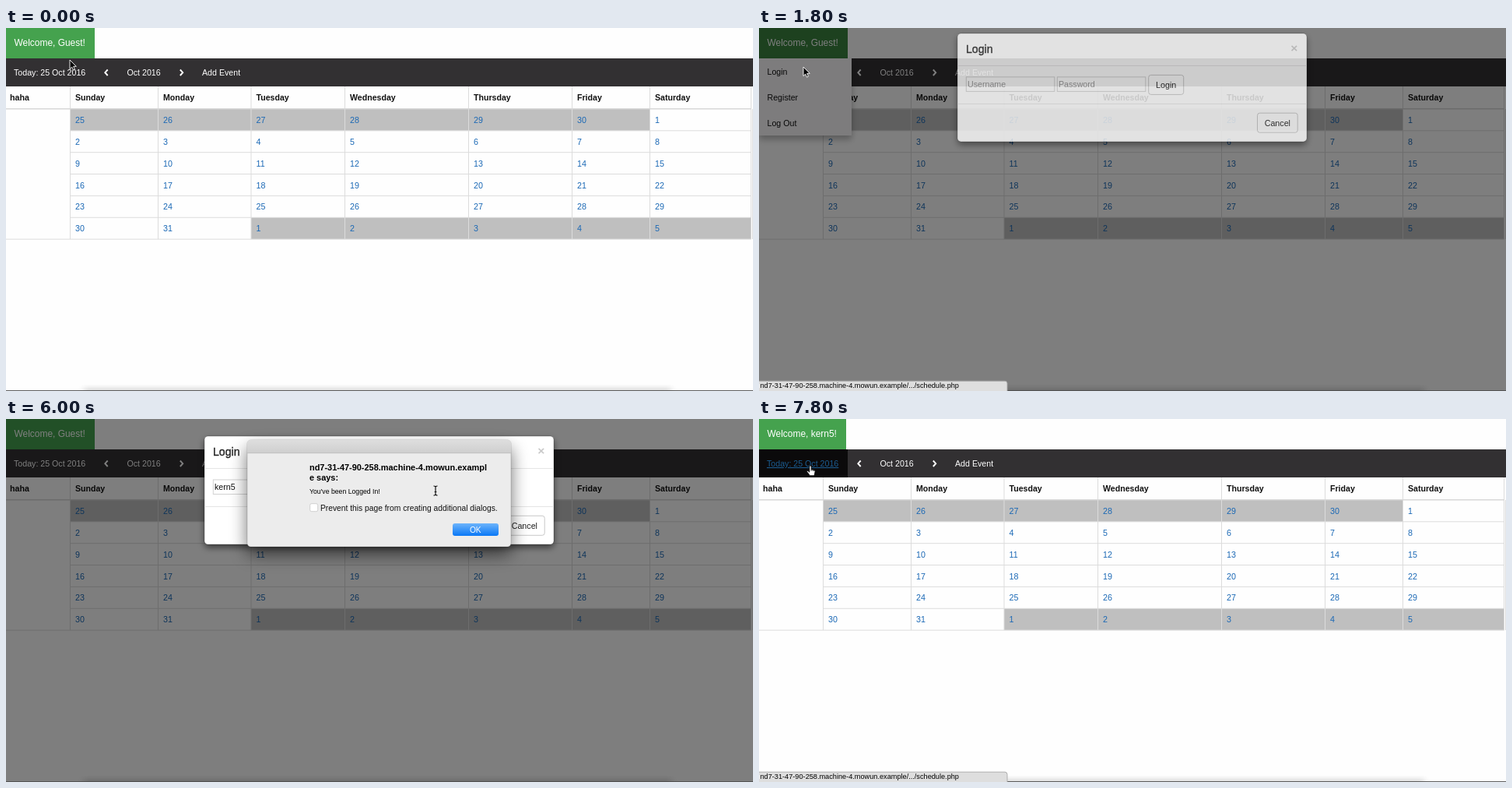
Write an HTML page that moves like this. It is 960 by 466 pixels and loops after 8000 ms.

```html
<!DOCTYPE html>
<html lang="en">
<head>
<meta charset="utf-8">
<title>Calendar login</title>
<style>
html, body { margin: 0; width: 100%; height: 100%; overflow: hidden; background: #fefefe; }
svg { display: block; width: 100vw; height: 100vh; }
text { font-family: "Liberation Sans", Arial, sans-serif; white-space: pre; }
</style>
</head>
<body>
<svg id="stage" viewBox="0 0 960 466"></svg>
<script>
const LOOP = 8000, STEP = 200;
const USER = 'kern5';
const HOST = 'nd7-31-47-90-258.machine-4.mowun.example';
const LINK = '#1a68b5', BODY = '#111';

const rect = (x, y, w, h, fill, more = '') =>
  `<rect x="${x}" y="${y}" width="${w}" height="${h}" fill="${fill}" ${more}/>`;
const text = (x, y, s, size = 10.65, fill = BODY, more = '') =>
  `<text x="${x}" y="${y}" font-size="${size}" fill="${fill}" ${more}>${s}</text>`;
const path = (d, more) => `<path d="${d}" ${more}/>`;
const group = (id, inner) => `<g id="${id}">${inner}</g>`;
const blur = (id, sd) =>
  `<filter id="${id}" x="-50%" y="-50%" width="200%" height="200%"><feGaussianBlur stdDeviation="${sd}"/></filter>`;
const gradient = (id, top, bottom) =>
  `<linearGradient id="${id}" x2="0" y2="1"><stop stop-color="${top}"/><stop offset="1" stop-color="${bottom}"/></linearGradient>`;
const BOLD = 'font-weight="700"', MID = 'text-anchor="middle"';

function calendar() {
  const cols = [82.5, 195.5, 315, 435.5, 594.5, 727.5, 827.5, 957.5];
  const days = ['Sunday', 'Monday', 'Tuesday', 'Wednesday', 'Thursday', 'Friday', 'Saturday'];
  const top = 104, pitch = 27.85, bottom = top + 6 * pitch;
  let cells = '', lines = '', labels = text(5, 93, 'haha', 10.65, BODY, BOLD);
  days.forEach((day, c) => labels += text(cols[c] + 6.5, 93, day, 10.6, BODY, BOLD));
  for (let i = 0; i < 42; i++) {
    const c = i % 7, r = Math.floor(i / 7), y = top + r * pitch;
    const day = i - 5;
    const outside = day < 1 || day > 31;
    const label = day < 1 ? day + 30 : day > 31 ? day - 31 : day;
    if (outside) cells += rect(cols[c], y, cols[c + 1] - cols[c], pitch, '#bfbfbf');
    labels += text(cols[c] + 6.5, y + 18, label, 10.7, LINK);
  }
  for (let r = 1; r < 6; r++) lines += `M82.5 ${top + r * pitch}H957.5`;
  lines += `M0 ${bottom}H957.5M959.5 104V${bottom}`;
  cols.forEach(x => lines += `M${x} 75V${bottom}`);
  return cells + path(lines, 'stroke="#dcdcdc" fill="none"') +
    path('M0 103.7H957.5', 'stroke="#d8d8d8" stroke-width="1.5"') + labels;
}

function navbar() {
  const chevron = (x, dir) => path(`M${x + 1.7 * dir} 53.5L${x - 1.7 * dir} 57.2L${x + 1.7 * dir} 61`,
    'fill="none" stroke="#fff" stroke-width="1.9"');
  return rect(0, 39, 960, 36, '#323032') +
    rect(0, 39, 114, 36, '#0b0a0b', 'id="todayBg"') +
    text(10, 61, 'Today: 25 Oct 2016', 10.65, '#fff', 'id="today"') +
    chevron(129, 1) + chevron(225.5, -1) +
    text(155.5, 61, 'Oct 2016', 10.65, '#fff') + text(252, 61, 'Add Event', 10.65, '#fff');
}

function menu() {
  return rect(0, 44, 119, 99, '#000', 'opacity=".28" filter="url(#soft)"') +
    rect(0, 39, 119, 99, '#fbfafc') + rect(0, 39, 119, 33, '#f0eff0', 'id="loginRow"') +
    ['Login', 'Register', 'Log Out'].map((s, i) => text(10.5, 59.7 + 33 * i, s)).join('');
}

function modal() {
  const button = (x, y, w, s) =>
    rect(x, y, w, 25, '#fff', 'rx="3" stroke="#c8c8c8"') + text(x + w / 2, y + 16.5, s, 10.7, '#222', MID);
  const field = (id, x) =>
    rect(x, 78, 113.5, 18.5, '#fff', 'stroke="#d2d2d2"') +
    rect(x - .3, 77.6, 114, 19.2, 'none', `id="${id}Ring" rx="1.5" stroke="#69aaf0" stroke-width="2.4"`) +
    text(x + 1.7, 91, '', 10.65, BODY, `id="${id}"`) +
    path('M0 82V93', `id="${id}Caret" stroke="#000" stroke-width=".9"`);
  return rect(255, 26, 449, 139, '#000', 'rx="5" opacity=".55" filter="url(#soft)"') +
    rect(255, 22, 449, 139, '#fff', 'rx="4.5" stroke="#000" stroke-opacity=".25"') +
    text(266, 47.3, 'Login', 14.1, '#222', 'stroke="#222" stroke-width=".35"') +
    text(687.7, 46, '×', 15.5, '#c9c9c9', BOLD + ' ' + MID) +
    path('M255.5 63.5H703.5M255.5 112.5H703.5', 'stroke="#e5e5e5"') +
    field('name', 266.3) + field('pass', 383.3) +
    button(500.7, 75.5, 45, 'Login') + button(640.5, 124.3, 51.7, 'Cancel');
}

function alertBox() {
  return rect(310, 37, 339, 137, '#000', 'rx="5" opacity=".55" filter="url(#wide)"') +
    rect(310, 27, 339, 137, '#ececec', 'rx="4.5" stroke="#000" stroke-opacity=".2" stroke-width=".8"') +
    path('M310 44V31.5Q310 27 314.5 27H644.5Q649 27 649 31.5V44Z', 'fill="url(#bar)"') +
    path('M310 43.7H649', 'stroke="#bdbdbd" stroke-width=".8"') +
    text(390, 66.3, HOST.slice(0, -1), 10.95, '#000', BOLD) +
    text(390, 79.3, HOST.slice(-1) + ' says:', 10.95, '#000', BOLD) +
    text(390, 95.5, "You've been Logged In!", 8.7, '#000') +
    rect(390.7, 108.7, 10, 10, '#fff', 'rx="2" stroke="#c6c6c6" stroke-width=".8"') +
    text(404, 117.5, 'Prevent this page from creating additional dialogs.', 10.28, '#111') +
    rect(574, 134, 59, 16, 'url(#ok)', 'rx="3"') + text(603.3, 145.7, 'OK', 10.2, '#fff', MID);
}

const cursors =
  path('M0 0V11.6L2.7 9.1 4.5 13.1 6.4 12.2 4.7 8.3H8.3Z',
    'id="arrow" fill="#000" stroke="#fff" stroke-width=".9"') +
  path('M-1.2 6V1A1.2 1.2 0 0 1 1.2 1V4.4L4.8 5.2Q6.3 5.6 6.2 7.2L5.6 10.3 5 12.8H-1L-2 10.7-4.6 7.5Q-4.4 6-2.8 6.8L-1.2 8.2Z' +
    'M1.2 4.4V6.5M3.1 4.9V6.7M4.8 5.3V7', 'id="hand" fill="#fff" stroke="#000" stroke-width=".9"') +
  path('M-2.5-5.5Q0-5.5 0-4Q0-5.5 2.5-5.5M0-4.5V5.5M-2.5 6.5Q0 6.5 0 5Q0 6.5 2.5 6.5M-1.3 2H1.3',
    'id="beam" fill="none" stroke="#000" stroke-width="1.1"');

document.getElementById('stage').innerHTML =
  '<defs>' + blur('soft', 4.5) + blur('wide', 11) + gradient('bar', '#dedede', '#cecece') +
  gradient('ok', '#6db4fb', '#0a78f6') + '</defs>' +
  rect(0, 0, 960, 466, '#fefefe') + calendar() + navbar() +
  rect(0, 0, 114, 39, '#45a24e', 'id="welcomeBg"') +
  text(10.5, 23.3, '', 11.95, '#fff', 'id="welcome"') +
  group('menu', menu()) + rect(0, 0, 960, 466, '#000', 'id="shade"') +
  group('modal', modal()) + group('alert', alertBox()) +
  rect(100, 464, 755, 12, '#000', 'opacity=".22" filter="url(#soft)"') +
  path('M0 465.6H960', 'stroke="#505050"') +
  group('status', path('M-1 467V453.2H316Q319 453.2 319 456.2V467Z', 'fill="#dedede" stroke="#a8a8a8" stroke-width=".9"') +
    text(1.5, 462.3, HOST + '/.../schedule.php', 9.18, '#000')) +
  group('cursor', cursors);

const el = {};
document.querySelectorAll('[id]').forEach(n => el[n.id] = n);

const ramp = (t, start, span) => Math.min(1, Math.max(0, (t - start) / span));
const show = (id, on) => el[id].setAttribute('display', on ? 'inline' : 'none');
const set = (id, key, value) => el[id].setAttribute(key, value);

const pointer = [
  [0, 'arrow', 82, 41], [400, 'hand', 74, 25], [600, 'hand', 66, 26], [800, 'hand', 60, 36],
  [1000, 'hand', 58, 51.5], [1800, 'arrow', 57, 50], [2400, 'arrow', 120, 62], [2600, 'arrow', 230, 80],
  [2800, 'beam', 310, 88], [3400, ''], [5800, 'beam', 552, 91.5], [6200, 'arrow', 582, 122],
  [6400, 'arrow', 604, 146], [7400, 'arrow', 400, 105], [7600, 'hand', 90, 60], [7800, 'hand', 66, 60]
];

function field(id, value, hint, focus, x, advance) {
  el[id].textContent = value || hint;
  set(id, 'fill', value ? BODY : '#9a9a9a');
  show(id + 'Ring', focus);
  show(id + 'Caret', focus);
  set(id + 'Caret', 'transform', `translate(${x + value.length * advance})`);
}

function render(now) {
  const t = Math.floor(now % LOOP / STEP) * STEP;
  const during = (a, b) => t >= a && t < b;
  const open = during(400, 2400), logged = t >= 6800, onToday = t >= 7600;

  el.welcome.textContent = `Welcome, ${logged ? USER : 'Guest'}!`;
  set('welcomeBg', 'width', logged ? 112 : 114);
  set('welcomeBg', 'fill', open ? '#3a833f' : '#45a24e');
  show('menu', open);
  show('loginRow', during(1000, 1800));
  show('todayBg', onToday);
  set('today', 'fill', onToday ? '#1b5b8f' : '#fff');
  set('today', 'text-decoration', onToday ? 'underline' : 'none');
  show('status', during(1200, 2800) || t >= 7800);

  // the dialog waits for the shade on entry, the shade waits for the dialog on exit
  set('shade', 'opacity', .5 * (ramp(t, 1533, 150) - ramp(t, 6916, 150)));
  set('modal', 'opacity', ramp(t, 1683, 150) - ramp(t, 6616, 150));
  set('modal', 'transform', `translate(0 ${-35 * (1 - ramp(t, 1683, 300)) ** 1.7})`);
  show('alert', during(5600, 6800));

  const typed = Math.max(0, (t - 3200) / STEP);
  const dots = Math.min(5, Math.max(0, (t - 4200) / STEP));
  field('name', USER.slice(0, typed), 'Username', during(3000, 4400), 268.3, 5.35);
  field('pass', '•'.repeat(t < 4600 ? 0 : dots), 'Password', during(4400, 5600), 385.5, 3.8);

  const [, kind, x, y] = pointer.filter(p => p[0] <= t).pop();
  ['arrow', 'hand', 'beam'].forEach(k => show(k, k === kind));
  if (kind) set('cursor', 'transform', `translate(${x} ${y})`);
}

const start = performance.now();
function tick() {
  render(performance.now() - start);
  requestAnimationFrame(tick);
}
tick();
</script>
</body>
</html>
```
